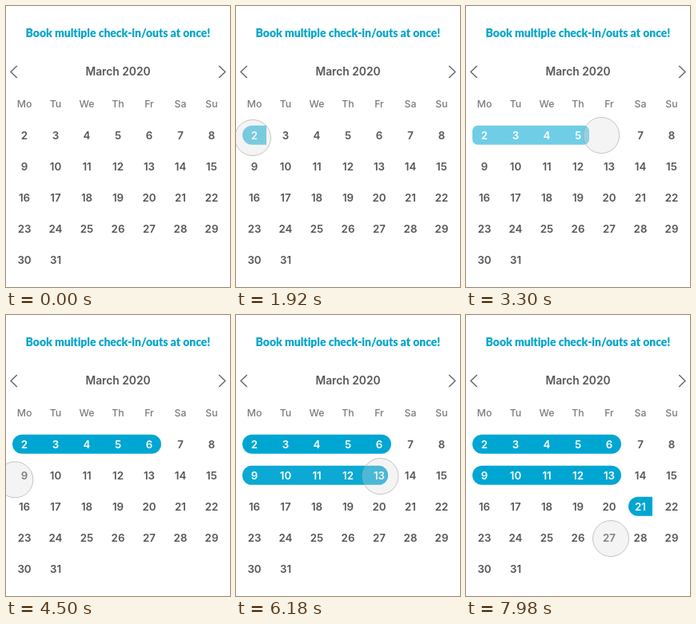
Animation, 280 px wide and 352 px high, one loop 8000 ms. Source, as an HTML page with a canvas:

```html
<!DOCTYPE html>
<html lang="en">
<head>
<meta charset="utf-8">
<title>Calendar range selection</title>
<style>
html, body { margin: 0; width: 100%; height: 100%; overflow: hidden; background: #fff; }
canvas { display: block; width: 280px; height: 352px; }
</style>
</head>
<body>
<canvas id="stage"></canvas>
<script>
const W = 280, H = 352, LOOP = 8000;
const BLUE = '0,166,210', INK = 86;
const DAYS = ['Mo', 'Tu', 'We', 'Th', 'Fr', 'Sa', 'Su'];
const canvas = document.getElementById('stage');
const ctx = canvas.getContext('2d');
const dpr = window.devicePixelRatio || 1;
canvas.width = W * dpr;
canvas.height = H * dpr;

const clamp = v => Math.max(0, Math.min(1, v));
const mix = (a, b, p) => a + (b - a) * p;
const span = (t, from, to) => clamp((t - from) / (to - from));
const easeOut = (u, k = 1.86) => 1 - Math.pow(1 - u, k);
const easeInOut = (u, k = 2.5) =>
  u < 0.5 ? Math.pow(2 * u, k) / 2 : 1 - Math.pow(2 - 2 * u, k) / 2;

const colX = c => 23 + 39 * c;
const rowY = r => 162 + 39 * r;

// Each pick fades in a start cell, then optionally grows to a range.
const PICKS = [
  { row: 0, col: 0, click: 1800, grow: 2980, last: 4 },
  { row: 1, col: 0, click: 4780, grow: 5740, last: 4 },
  { row: 2, col: 5, click: 7000, grow: Infinity, last: 5 }
];

function pickState(pick, t) {
  const start = span(t, pick.click, pick.click + 175);
  const grow = t < pick.grow ? 0 : easeInOut(span(t, pick.grow, pick.grow + 520));
  const range = grow ? clamp(1 - 1.7 * (1 - grow)) : 0;
  return { start, grow, range, cell: start * (1 - clamp(grow * 2.5)) };
}

function cursorAt(t) {
  if (t < 3700) {
    if (t < 2060) {
      const p = easeInOut(span(t, 960, 1680), 2);
      return [mix(-24, 21, p), mix(131, 165, p)];
    }
    const p = easeOut(span(t, 2060, 2820));
    return [mix(21, 169.2, p), mix(165, 162, p)];
  }
  if (t < 4220) {
    const p = Math.pow(span(t, 3690, 3970), 1.7);
    return [mix(169.2, -25, p), mix(162, 237, p)];
  }
  if (t < 4900) {
    const u = span(t, 4230, 4640);
    return [mix(-24, 16, easeOut(u, 2)), mix(222.5, 198, u)];
  }
  if (t < 6430) {
    const p = easeOut(span(t, 4900, 5700));
    return [mix(16, 180.5, p), mix(198, 202, p) + 24 * p * (1 - p)];
  }
  if (t < 7260) {
    const p = easeInOut(span(t, 6430, 6980), 2);
    return [mix(180.5, 212.5, p), mix(202, 234.5, p)];
  }
  const p = easeInOut(span(t, 7260, 7980), 2);
  return [mix(212.5, 181, p), mix(234.5, 280, p)];
}

function text(str, x, y, font, color) {
  ctx.font = font;
  ctx.fillStyle = color;
  ctx.fillText(str, x, y);
}

function pill(x0, x1, y, left, right, alpha) {
  if (alpha <= 0) return;
  ctx.fillStyle = `rgba(${BLUE},${alpha})`;
  ctx.beginPath();
  ctx.roundRect(x0, y - 12.2, x1 - x0, 24, [left, right, right, left]);
  ctx.fill();
}

function chevron(tip, back) {
  ctx.beginPath();
  ctx.moveTo(back, 75);
  ctx.lineTo(tip, 82.5);
  ctx.lineTo(back, 90);
  ctx.strokeStyle = '#666';
  ctx.lineWidth = 1.4;
  ctx.stroke();
}

function drawDates(states) {
  for (let day = 2; day <= 31; day++) {
    const col = (day - 2) % 7, row = Math.floor((day - 2) / 7);
    let white = 0;
    PICKS.forEach((pick, i) => {
      if (pick.row !== row || col < pick.col || col > pick.last) return;
      white = clamp(col === pick.col ? states[i].start * 2 : states[i].grow * 2);
    });
    const v = Math.round(mix(INK, 255, white));
    text(day, colX(col), rowY(row) + 5.3, '600 13.3px Inter, sans-serif', `rgb(${v},${v},${v})`);
  }
}

function drawCursor([x, y]) {
  ctx.beginPath();
  ctx.arc(x, y, 22.5, 0, Math.PI * 2);
  ctx.fillStyle = 'rgba(218,218,218,.3)';
  ctx.fill();
  ctx.strokeStyle = 'rgba(165,165,165,.8)';
  ctx.lineWidth = 0.8;
  ctx.stroke();
}

function draw(t) {
  ctx.setTransform(dpr, 0, 0, dpr, 0, 0);
  ctx.fillStyle = '#fff';
  ctx.fillRect(0, 0, W, H);
  ctx.textAlign = 'center';
  ctx.letterSpacing = '-0.05px'; // any spacing turns ligatures off
  text('Book multiple check-in/outs at once!', 140, 38.5, '900 14px Lato, sans-serif', '#00a5cb');
  ctx.letterSpacing = '0px';
  text('March 2020', 140, 87.3, '600 13.8px Inter, sans-serif', '#585858');
  chevron(6, 13.8);
  chevron(274, 266.2);
  DAYS.forEach((d, c) => text(d, colX(c), 126.5, '500 12.3px Inter, sans-serif', '#7c7c7c'));

  const states = PICKS.map(p => pickState(p, t));
  PICKS.forEach((p, i) => {
    const s = states[i], x = colX(p.col) - 15, y = rowY(p.row);
    const end = mix(x + 30, colX(p.last) + 15, s.grow), round = 12 * s.range;
    pill(x, x + 30, y, 12, 0, s.cell);
    pill(x, end, y, round, round, s.range);
  });
  drawDates(states);
  drawCursor(cursorAt(t));
}

function frame() {
  draw(performance.now() % LOOP);
  requestAnimationFrame(frame);
}
frame();
</script>
</body>
</html>
```
